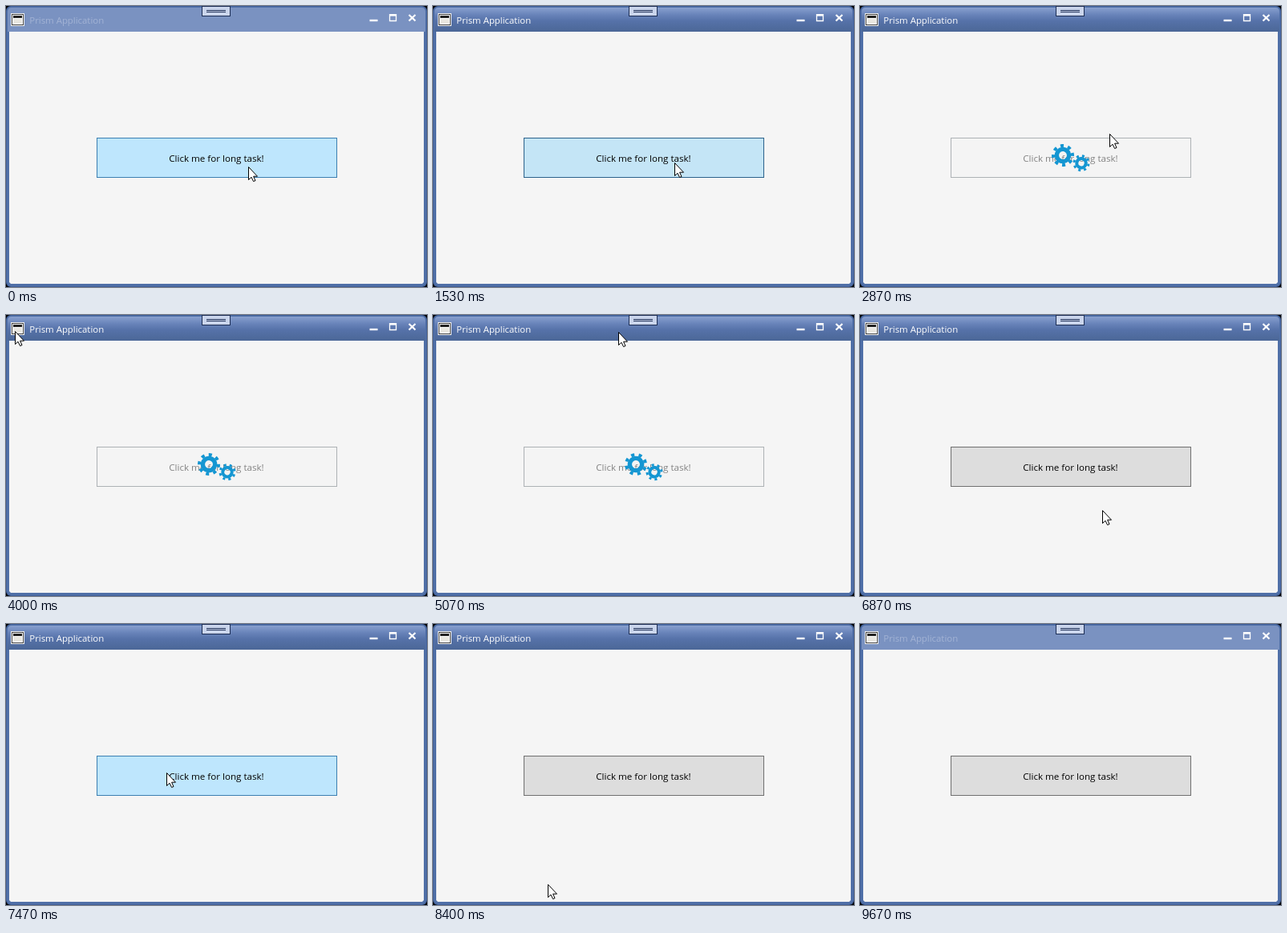
An HTML page that plays this animation: 525 px wide and 350 px high, repeating every 9.74 s.

```html
<!DOCTYPE html>
<html lang="en">
<head>
<meta charset="utf-8">
<title>Prism Application</title>
<style>
  html, body { margin: 0; width: 100%; height: 100%; overflow: hidden; background: #000; }
  svg { display: block; }
  text { font-family: "Open Sans", "Noto Sans", sans-serif; }
  #bar { fill: #7a92c1; }
  #title { fill: #a3b3d5; font-size: 11.4px; font-weight: 500; }
  .active #bar { fill: url(#sheen); }
  .active #title { fill: #fff; }
  #button { font-size: 11.6px; }
  .normal { fill: #dddddd; stroke: #707070; }
  .hover { fill: #bee6fd; stroke: #3c7fb1; }
  .pressed { fill: #c4e5f6; stroke: #2c628b; }
  .disabled { fill: #f4f4f4; stroke: #adb2b5; }
  #button text { fill: #000; stroke: none; }
  #button.disabled text { fill: #838383; }
</style>
</head>
<body>
<svg id="window" width="525" height="350" viewBox="0 0 525 350">
  <defs>
    <linearGradient id="sheen" x1="0" y1="0" x2="0" y2="1">
      <stop offset="0" stop-color="#88a0cf"/>
      <stop offset=".3" stop-color="#6883b9"/>
      <stop offset=".55" stop-color="#5672a9"/>
      <stop offset="1" stop-color="#4b6797"/>
    </linearGradient>
    <!-- Ring plus eight dashes as teeth -->
    <g id="gear" fill="none" stroke="#1496d2">
      <circle r="7.6" stroke-width="5.4"/>
      <circle r="12" stroke-width="4" pathLength="8" stroke-dasharray=".44 .56" stroke-dashoffset=".22"/>
    </g>
  </defs>

  <!-- Window frame -->
  <rect width="525" height="350" rx="6" fill="#41609a"/>
  <rect x="1" y="1" width="523" height="348" rx="5" fill="#5070a8"/>
  <path id="bar" d="M2 32V7Q2 2 7 2H518Q523 2 523 7V32Z"/>
  <path d="M4 32H521V344L519 346H6L4 344Z" fill="#f5f5f5"/>

  <!-- Title bar -->
  <g shape-rendering="crispEdges">
    <rect x="6" y="9" width="17" height="16" fill="#f0f0f0"/>
    <rect x="7" y="10" width="15" height="14" fill="#444"/>
    <rect x="8" y="11" width="13" height="12" fill="#fff"/>
    <rect x="9" y="12" width="11" height="3" fill="#222"/>
    <rect x="9" y="16" width="11" height="6" fill="#e8e6e0"/>
    <rect x="244" y="-1" width="36" height="14" fill="#1d2e55"/>
    <rect x="245" y="1" width="34" height="11" fill="#cad5ec"/>
    <path d="M250 5.5H274M250 7.5H274" stroke="#1d2e55"/>
  </g>
  <text id="title" x="29.3" y="22">Prism Application</text>
  <g fill="none" stroke="#fff">
    <path d="M453.5 18H463.5" stroke-width="2.4"/>
    <path d="M478.5 10V18.5H486.5V10" stroke-width="1.3"/>
    <path d="M478 11.3H487" stroke-width="2.6"/>
    <path d="M502.5 11L510.5 18.5M510.5 11L502.5 18.5" stroke-width="2.2"/>
  </g>

  <g id="button">
    <rect x="113.5" y="164.5" width="299" height="49"/>
    <text x="262.5" y="194" text-anchor="middle">Click me for long task!</text>
  </g>

  <g id="gears">
    <use id="big" href="#gear"/>
    <use id="small" href="#gear"/>
  </g>
  <path id="cursor" d="M.5 .5V16.5L4 13.2L6.6 18.5L9 17.5L6.6 12.2H11.5Z"
        fill="#fff" stroke="#000" stroke-linejoin="round"/>
</svg>
<script>
const LOOP = 9740, FPS = 15;
const PRESS = 23, BUSY_START = 25, BUSY_END = 101, BLUR = 145;

// Places the pointer passes: tick, x, y
const stops = [
  [9, 302, 200], [10, 301, 195],                              // settle on the button
  [25, 301, 195], [36, 379, 255], [52, 212, 19],              // wander off and up
  [60, 11, 20], [68, 329, 21], [90, 4, 21],                   // sweep along the title bar
  [92, 86, 22], [97, 345, 81], [104, 300, 252], [112, 200, 185], // circle back to the button
  [117, 235, 262], [121, 235, 262], [129, 100, 352]           // leave at the bottom
];

const $ = id => document.getElementById(id);
const place = (id, transform) => $(id).setAttribute("transform", transform);
const ease = p => p * p * (3 - 2 * p);

function pointerAt(tick) {
  const next = stops.findIndex(stop => stop[0] > tick);
  if (next < 1) return stops.at(next).slice(1);
  const [t0, ...from] = stops[next - 1], [t1, ...to] = stops[next];
  const p = ease((tick - t0) / (t1 - t0));
  return from.map((v, i) => Math.round(v + (to[i] - v) * p));
}

function buttonState(tick, x, y) {
  if (tick >= BUSY_START && tick < BUSY_END) return "disabled";
  if (tick >= PRESS && tick < BUSY_START) return "pressed";
  return x >= 113 && x < 413 && y >= 164 && y < 214 ? "hover" : "normal";
}

function draw(ms) {
  const tick = Math.floor((ms % LOOP + 3.4) * FPS / 1000);
  const [x, y] = tick < stops[0][0] ? stops[0].slice(1) : pointerAt(tick);
  const state = buttonState(tick, x, y);

  $("window").classList.toggle("active", tick >= PRESS && tick < BLUR);
  $("button").setAttribute("class", state);
  $("gears").setAttribute("visibility", state === "disabled" ? "visible" : "hidden");

  // The small gear is 3/4 the size and turns 4/3 as fast the other way
  const turn = (tick - 43) * 6;
  place("big", `translate(253 186) rotate(${-5 - turn * 0.75})`);
  place("small", `translate(276 195.7) rotate(${15 + turn}) scale(.75)`);
  place("cursor", `translate(${x} ${y})`);
}

const start = performance.now();
function frame() {
  draw(performance.now() - start);
  requestAnimationFrame(frame);
}
frame();
</script>
</body>
</html>
```
